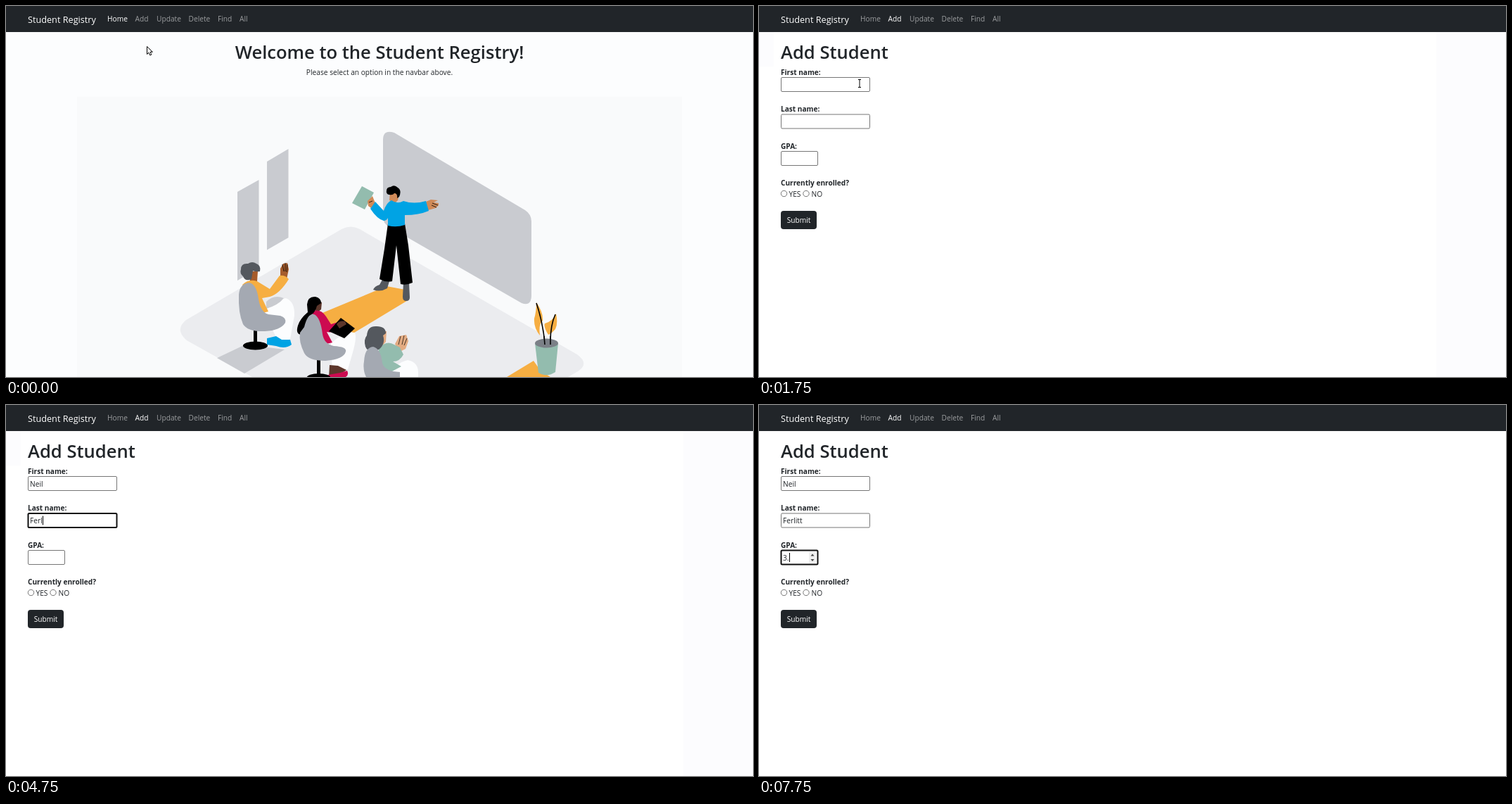
Write an HTML page that moves like this. It is 1062 by 527 pixels and loops after 8000 ms.

```html
<!DOCTYPE html>
<html lang="en">
<head>
<meta charset="utf-8">
<title>Student Registry</title>
<style>
html, body { margin: 0; width: 100%; height: 100%; overflow: hidden; background: #fff; }
svg { display: block; width: 1062px; height: 527px; }
text { font: 10.2px "Open Sans", "Noto Sans", sans-serif; fill: #212529; white-space: pre; }
.h1 { font-size: 25.6px; font-weight: 600; }
.label { font-size: 10.1px; font-weight: 700; }
.brand { font-size: 12.7px; fill: #fff; }
.light { fill: #fff; }
.mid { text-anchor: middle; }
.status { font-size: 7.65px; fill: #5f6368; }
.box { fill: #fff; stroke: #767676; }
.focus { stroke: #101010; stroke-width: 2; }
.grey { fill: #c9cbd0; }
.chair { fill: #a4a9b2; }
.slate { fill: #54585e; }
.blue { fill: #00a3e4; }
.gold { fill: #f6ae42; }
.sage { fill: #93bcae; }
.red { fill: #cc0a50; }
.white { fill: #fcfdfe; }
.tan { fill: #d08a58; }
.brown { fill: #a65c2c; }
.dark { fill: #5c362b; }
.pale { fill: #e3ab82; }
.line { fill: none; stroke: #000; stroke-width: 1.6; }
.pointer { fill: #fff; stroke: #000; stroke-width: 1; stroke-linejoin: round; }
</style>
</head>
<body>
<svg viewBox="0 0 1062 527">
  <g id="home">
    <rect width="1062" height="527" fill="#fcfdfe"/>
    <text class="h1 mid" x="531" y="74.5">Welcome to the Student Registry!</text>
    <text class="mid" x="531" y="97.5">Please select an option in the navbar above.</text>
    <rect x="101" y="129" width="860" height="398" fill="#f9fafb"/>

    <!-- room -->
    <path fill="#ebecef" d="M256 446L477 317Q490 310 503 317L812 495Q830 508 813 519L799 527H350L257 475Q239 460 256 446Z"/>
    <path class="grey" d="M536 190Q536 175 552 180L738 290Q747 296 747 306V411Q747 427 733 422L545 314Q536 309 536 300Z"/>
    <path class="grey" d="M371 221L401.500 203V329L371 346.500ZM329 264L359.500 247V372L329 390Z"/>
    <path class="gold" d="M440 440L541 398 573 404V417L495 464 460 456Z"/>
    <path class="grey" d="M300 500L340 481 396 488 339 522Z"/>

    <!-- teacher -->
    <path class="sage" d="M506 256L523 265 510 289 492 280Z"/>
    <path class="tan" d="M514 277L521 270 523 275 525 280 519 287 515 284ZM597 278L604 275 614 276 608 279 615 280 615 283 611 287 600 290ZM546 264H560L557 276 553 280 545 276Z"/>
    <path class="line" style="stroke-width:.8" d="M606 280L614 283M605 283L612 286M516 279L521 277"/>
    <path d="M541 265Q540 257 547 257Q552 253 557 258Q563 262 559 271L556 273Q557 266 552 266Q550 269 545 268Q542 268 541 265Z"/>
    <path class="slate" d="M535 389L545 391 542 401Q532 407 522 403Q524 398 531 396ZM565 393H573L574 414Q574 419 569 419Q564 419 564 413Z"/>
    <path d="M543 309H567L572 340 578 393Q569 397 561 395L555 340 549 391Q540 393 531 388L538 345Z"/>
    <path class="blue" d="M548 276Q541 279 537 291L525 278 518 288Q528 303 537 305Q541 305 543 301V312Q555 315 567 311V297Q587 297 601 291L597 277Q580 282 565 277Q556 282 548 276Z"/>

    <!-- student with raised hand -->
    <path class="white" d="M364 436Q378 418 398 415Q411 420 410 440L404 473Q394 478 385 473L380 462Z"/>
    <path class="grey" d="M370 420Q381 409 395 415Q387 425 370 430Z"/>
    <path class="blue" d="M371 472L384 469 392 474 404 474 406 481Q397 488 384 483L371 481Z"/>
    <path class="brown" d="M349 377H358L357 391 346 394ZM390 384L390 373 394 366 400 365 402 374 399 388Z"/>
    <path class="line" style="stroke-width:.8" d="M393 367L395 377M397 365L397 377M400 367L399 378"/>
    <path class="slate" d="M334 374Q334 365 344 366Q350 362 356 366Q363 369 361 377Q355 378 351 376L349 388Q340 392 337 384Q332 380 334 374Z"/>
    <path class="gold" d="M336 396Q345 387 357 391L375 402 389 383Q397 382 402 388Q389 409 375 413L364 415 373 434 357 438Z"/>
    <path d="M352 455H357V481H352Z"/>
    <ellipse cx="354.500" cy="482.500" rx="17.500" ry="6"/>
    <path class="chair" d="M331 410Q332 395 345 393Q356 394 359 416Q362 435 373 438L390 440Q399 443 397 450Q390 461 368 462Q344 463 337 452Q330 436 331 410Z"/>

    <!-- student with laptop -->
    <path class="white" d="M462 479Q479 463 496 464Q499 471 493 492L486 516 464 518Z"/>
    <path class="dark" d="M439 418L449 421 448 431 440 437ZM460 510L472 511 484 517 474 524 459 527Z"/>
    <path class="red" d="M435 434Q447 429 455 441L462 452 472 449 476 457Q466 465 456 463L464 478 447 482ZM458 524L475 521 485 518Q488 524 483 527H458Z"/>
    <path d="M459 462L476 443 496 458 481 472Z"/>
    <path class="dark" d="M470 452Q474 446 482 448L484 452 474 458Z"/>
    <path d="M428 424Q429 412 440 413Q448 415 448 422L442 426Q440 434 435 438Q431 453 421 467Q411 467 415 454Q418 444 429 435Z"/>
    <path d="M442 498H447V523H442Z"/>
    <ellipse cx="444.500" cy="528" rx="17" ry="6"/>
    <path class="chair" d="M424 456Q429 436 438 438Q447 442 450 466Q452 480 466 483Q485 484 483 491Q480 502 454 504Q430 504 424 493Q416 477 418 464Z"/>

    <!-- clapping student -->
    <path class="white" d="M545 527Q551 508 571 503Q586 506 586 520V527Z"/>
    <path class="pale" d="M532 462H541L540 477 533 485ZM556 486L553 480 559 469 569 467 572 476 568 487 560 491Z"/>
    <path class="line" style="stroke-width:.7" d="M561 469L558 481M566 468L563 481M570 472L566 482"/>
    <path class="sage" d="M530 486Q541 474 552 481L560 485 565 495Q560 505 550 505L562 512 545 521 530 519Z"/>
    <path class="slate" d="M513 468Q514 454 527 455Q540 455 540 465L536 468Q540 480 530 488Q515 494 511 484Q508 474 513 468Z"/>
    <path class="chair" d="M509 505Q510 485 522 484Q533 487 535 507Q538 519 560 520V527H512Q507 517 509 505Z"/>

    <!-- plant -->
    <path class="gold" d="M712 527L750 504 760 518 774 527ZM754 421Q764 435 763 447Q757 451 759 468Q750 457 751 444Q754 434 754 421ZM782 437Q785 451 781 459Q777 464 771 467Q764 456 766 451Q777 448 782 437Z"/>
    <path class="line" d="M754 422Q762 445 766 477M781 438Q774 453 774 477"/>
    <path class="sage" d="M752 479H785L781 520Q769 528 757 521Z"/>
    <ellipse cx="768.500" cy="479" rx="16.500" ry="6.500" fill="#7b8087"/>
    <path class="line" d="M765 469L766 481M774 469V481"/>
  </g>

  <g id="form">
    <g id="tint" fill="#fcfcfe">
      <rect id="edge" y="37" width="21"/>
      <rect x="963" y="37" width="99" height="490"/>
    </g>
    <text class="h1" x="31" y="74.500">Add Student</text>
    <text class="label" x="31" y="97.500">First name:</text>
    <text class="label" x="31" y="150">Last name:</text>
    <text class="label" x="31" y="202.500">GPA:</text>
    <text class="label" x="31" y="255">Currently enrolled?</text>
    <g id="fields"></g>
    <g id="spinner">
      <rect x="71" y="208.500" width="10" height="16.500" fill="#efefef"/>
      <path fill="#444" d="M73.500 214.500L76 211.500 78.500 214.500ZM73.500 219L76 222 78.500 219Z"/>
    </g>
    <path id="caret" stroke="#000"/>
    <circle class="box" cx="35.500" cy="266.500" r="4.200"/>
    <circle class="box" cx="67" cy="266.500" r="4.200"/>
    <text x="42.500" y="271">YES</text>
    <text x="74.500" y="271">NO</text>
    <rect x="31" y="291" width="51" height="26" rx="4" fill="#212529"/>
    <text class="light mid" x="56.500" y="307.800">Submit</text>
  </g>

  <rect width="1062" height="37" fill="#212529"/>
  <text class="brand" x="31" y="23.500">Student Registry</text>
  <g id="nav"></g>

  <g id="status">
    <path d="M0 515H71Q75 515 75 519V527H0Z" fill="#dee1e6"/>
    <text class="status" x="1.500" y="525.500">localhost:5678/add</text>
  </g>

  <path id="arrow" class="pointer" d="M.5.500V11.500L3 9.200 4.800 13 6.800 12.100 5 8.300H8.300Z"/>
  <path id="hand" class="pointer" d="M-1 1Q0-.5 1 1V6Q2 5 3.200 6.300Q4.400 5.600 5.200 7Q7 6.700 7 8.500V11Q7 14 5.500 16H-.5Q-1.500 13-4 10Q-3.500 8-1 10Z"/>
  <path id="beam" fill="none" stroke="#000" d="M-2-5.500H2M0-5.500V5.500M-2 5.500H2"/>
</svg>
<script>
const LOOP = 8000;
const $ = id => document.getElementById(id);
const show = (id, on) => $(id).style.display = on ? '' : 'none';

function add(parent, tag, attrs, text = '') {
  const el = document.createElementNS('http://www.w3.org/2000/svg', tag);
  for (const key in attrs) el.setAttribute(key, attrs[key]);
  el.textContent = text;
  return $(parent).appendChild(el);
}

const links = [['Home', 144], ['Add', 183.5], ['Update', 214], ['Delete', 259.5], ['Find', 301], ['All', 332]]
  .map(([name, x]) => add('nav', 'text', { x, y: 22.3 }, name));

const fields = [[101, 127], [153.5, 127], [206, 53]].map(([y, width]) => ({
  y,
  box: add('fields', 'rect', { x: 31.5, y: y + .5, width: width - 1, height: 20, rx: 1.5 }),
  text: add('fields', 'text', { x: 34, y: y + 14.5 })
}));

// [time, shape, x, y]
const pointer = [
  [0, 'arrow', 200, 57], [250, 'arrow', 199, 47], [500, 'arrow', 198, 37], [750, 'hand', 197, 30.5],
  [1250, 'arrow', 172.5, 86.5], [1500, 'arrow', 158, 94], [1750, 'beam', 143, 110], [2500, '']
];

// [time, focused field, its text, caret shown]
const first = 'Neil', last = 'Ferlitt';
const typing = [
  [0, -1, '', 0], [2000, 0, '', 1],
  [2500, 0, first.slice(0, 1), 1], [3000, 0, first.slice(0, 2), 1], [3250, 0, first.slice(0, 3), 1], [3500, 0, first, 1],
  [3750, 1, '', 1], [4250, 1, last.slice(0, 1), 1], [4500, 1, last.slice(0, 2), 1],
  [4750, 1, last.slice(0, 4), 1], [5000, 1, last, 1], [5500, 1, last, 0],
  [5750, 2, '', 1], [6250, 2, '', 0], [6750, 2, '', 1], [7250, 2, '', 0],
  [7500, 2, '3', 1], [7750, 2, '3.', 1]
];

const at = (track, t) => track.findLast(step => step[0] <= t);

function draw() {
  const t = performance.now() % LOOP;
  const onForm = t >= 1250;
  show('home', !onForm);
  show('form', onForm);
  show('status', t >= 750 && t < 1500);
  show('tint', t < 6750);
  $('edge').setAttribute('height', t < 1500 ? 490 : 49);

  links.forEach((link, i) => {
    const active = i === (onForm ? 1 : 0);
    const hover = i === 1 && t >= 750;
    link.style.fill = active ? '#fff' : hover ? '#c8c9ca' : '#9b9d9f';
  });

  const [, focus, typed, caretOn] = at(typing, t);
  const done = [first, last, ''];
  fields.forEach((field, i) => {
    field.box.setAttribute('class', i === focus ? 'box focus' : 'box');
    field.text.textContent = i < focus ? done[i] : i === focus ? typed : '';
  });
  show('spinner', focus === 2);
  show('caret', onForm && caretOn);
  if (onForm && caretOn) {
    const { y, text } = fields[focus];
    const x = Math.round(34 + (typed ? text.getComputedTextLength() : 0)) + .5;
    $('caret').setAttribute('d', `M${x} ${y + 4}V${y + 17}`);
  }

  const [, shape, x, y] = at(pointer, t);
  for (const id of ['arrow', 'hand', 'beam']) show(id, id === shape);
  if (shape) $(shape).setAttribute('transform', `translate(${x} ${y})`);
  requestAnimationFrame(draw);
}
draw();
</script>
</body>
</html>
```
